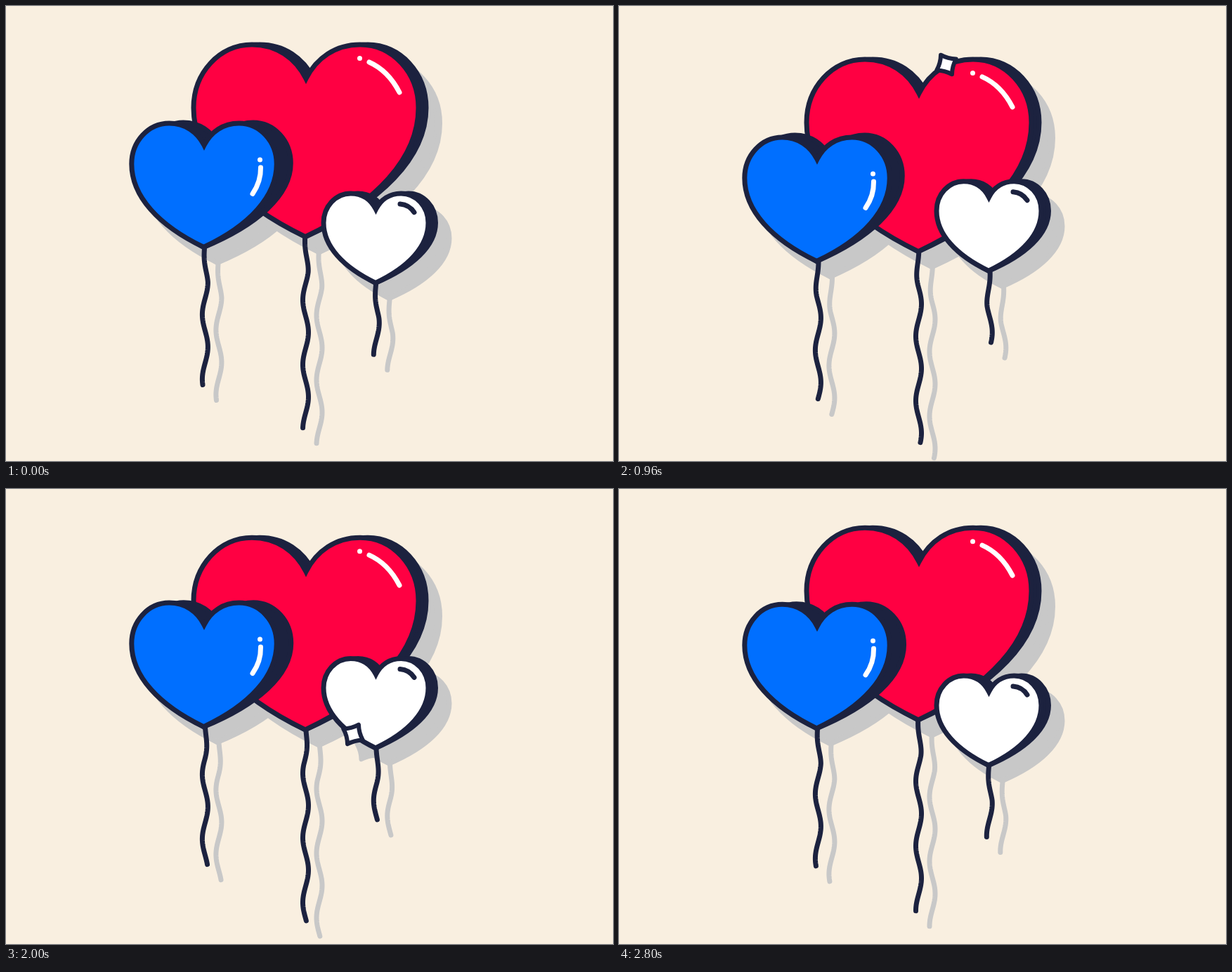
Animation of 864 by 648 pixels, one loop 2880 ms. Source, as an HTML page with a canvas:

```html
<!DOCTYPE html>
<html lang="en">
<head>
<meta charset="utf-8">
<title>Heart balloons</title>
<style>
  html, body { margin: 0; width: 100%; height: 100%; overflow: hidden; background: #f9efe0; }
  canvas { display: block; }
</style>
</head>
<body>
<canvas id="stage" width="864" height="648"></canvas>
<script>
const ctx = document.getElementById('stage').getContext('2d');
const STEP = 80, STEPS = 36;
const PAPER = '#f9efe0', INK = '#1c223f', SHADE = '#c8c8c8', WHITE = '#ffffff';
const TAU = Math.PI * 2, TIP = 273.7, LINE = 7;

// x and top: heart position at the highest point of its travel.
const balloons = [
  { x: 427, top: 55, size: 1, color: '#ff0042', travel: 24.5, start: 0, depth: 11, lean: 0,
    string: { x: 426.5, length: 273, crest: 44 },
    shine: { color: WHITE, dot: [503.5, 74.5], arc: [517, 80, 544, 92, 560, 123] },
    spark: { x: 466, y: 62.6, start: 8 } },
  { x: 282, top: 157.7, size: 0.645, color: '#006fff', travel: 30, start: 30, depth: 21, lean: 0.1,
    string: { x: 283.4, length: 197, crest: 50 },
    shine: { color: WHITE, dot: [361.5, 209.7], arc: [362.5, 220.7, 363, 241, 351, 258.2] },
    spark: { x: 190.4, y: 179, start: 0 } },
  { x: 526.5, top: 237, size: 0.4656, color: WHITE, travel: 30.2, start: 21, depth: 10.5, lean: 0,
    string: { x: 527.3, length: 102, crest: 57 },
    shine: { color: INK, arc: [561, 252, 574, 253, 581, 264] },
    spark: { x: 494, y: 345, start: 17 } }
];

const wrap = n => (n + STEPS) % STEPS;
const easeSine = u => (1 - Math.cos(Math.PI * u)) / 2;
const smooth = u => u * u * (3 - 2 * u);

// Sinks for 16 steps, rises for 20.
function drop(b, step) {
  const k = wrap(step - b.start);
  return b.travel * easeSine(k < 16 ? k / 16 : (STEPS - k) / 20);
}

function paint(fill, line, width = LINE) {
  ctx.lineWidth = width;
  ctx.strokeStyle = line;
  if (fill) {
    ctx.fillStyle = fill;
    ctx.fill();
  }
  ctx.stroke();
}

// The lobes move by dx, dy while the tip stays in place.
function heartPath(b, dx, dy) {
  const at = (x, y, pull = 1) => [b.x + x * b.size + dx * pull, b.top + y * b.size + dy * pull];
  const curve = (p, q, r) => ctx.bezierCurveTo(...p, ...q, ...r);
  ctx.beginPath();
  ctx.moveTo(...at(0, 48.5));
  curve(at(-15, 19), at(-42, 0), at(-77, 0));
  curve(at(-123, 0), at(-160, 40), at(-160, 90));
  curve(at(-160, 161), at(-101, 225.5, 0.5), at(-1, TIP, 0));
  curve(at(101, 225.5, 0.5), at(160, 161), at(160, 90));
  curve(at(160, 40), at(123, 0), at(77, 0));
  curve(at(42, 0), at(15, 19), at(0, 48.5));
  ctx.closePath();
}

function drawString(b, step, color) {
  const { x, length, crest } = b.string, period = 92;
  const y = b.top + TIP * b.size;
  ctx.beginPath();
  for (let s = 0; s <= length; s += 2) {
    const swing = 4 * (0.2 + 0.8 * Math.min(1, s / 50));
    const phase = (s - crest) / period - step / STEPS;
    ctx.lineTo(x + swing * Math.cos(TAU * phase), y + s);
  }
  ctx.lineCap = 'round';
  ctx.lineJoin = 'round';
  paint(null, color);
}

function drawShine({ color, dot, arc }) {
  const [x0, y0, cx, cy, x1, y1] = arc;
  ctx.beginPath();
  ctx.moveTo(x0, y0);
  ctx.quadraticCurveTo(cx, cy, x1, y1);
  ctx.lineCap = 'round';
  paint(null, color);
  if (!dot) return;
  ctx.beginPath();
  ctx.arc(...dot, 3.5, 0, TAU);
  ctx.fillStyle = color;
  ctx.fill();
}

function drawSpark(spark, step, fill, line) {
  const u = wrap(step - spark.start) / 12;
  if (u <= 0 || u >= 1) return;
  const r = 21.5 * smooth(1 - Math.abs(2 * u - 1));
  const polar = (radius, a) => [spark.x + radius * Math.cos(a), spark.y + radius * Math.sin(a)];
  const turn = Math.PI * u;
  ctx.beginPath();
  ctx.moveTo(...polar(r, turn));
  for (let i = 1; i <= 4; i++) {
    const a = turn + i * TAU / 4;
    ctx.quadraticCurveTo(...polar(r * 0.53, a - TAU / 8), ...polar(r, a));
  }
  ctx.closePath();
  ctx.lineJoin = 'round';
  paint(fill, line, 6);
}

function drawBalloon(b, step, shade) {
  const dy = drop(b, step), line = shade || INK;
  ctx.save();
  ctx.translate(0, dy);
  drawString(b, step, line);
  ctx.lineJoin = 'miter';
  heartPath(b, b.depth - b.lean * dy, -b.lean * dy);
  paint(line, line);
  heartPath(b, 0, 0);
  paint(shade || b.color, line);
  if (!shade) drawShine(b.shine);
  drawSpark(b.spark, step, shade || WHITE, line);
  ctx.restore();
}

function render(now) {
  const step = Math.floor(now / STEP) % STEPS;
  ctx.fillStyle = PAPER;
  ctx.fillRect(0, 0, 864, 648);
  ctx.save();
  ctx.translate(19.5, 22);
  balloons.forEach(b => drawBalloon(b, step, SHADE));
  ctx.restore();
  balloons.forEach(b => drawBalloon(b, step));
}

let origin;
function tick(now) {
  origin ??= now;
  render(now - origin);
  requestAnimationFrame(tick);
}
render(0);
requestAnimationFrame(tick);
</script>
</body>
</html>
```
